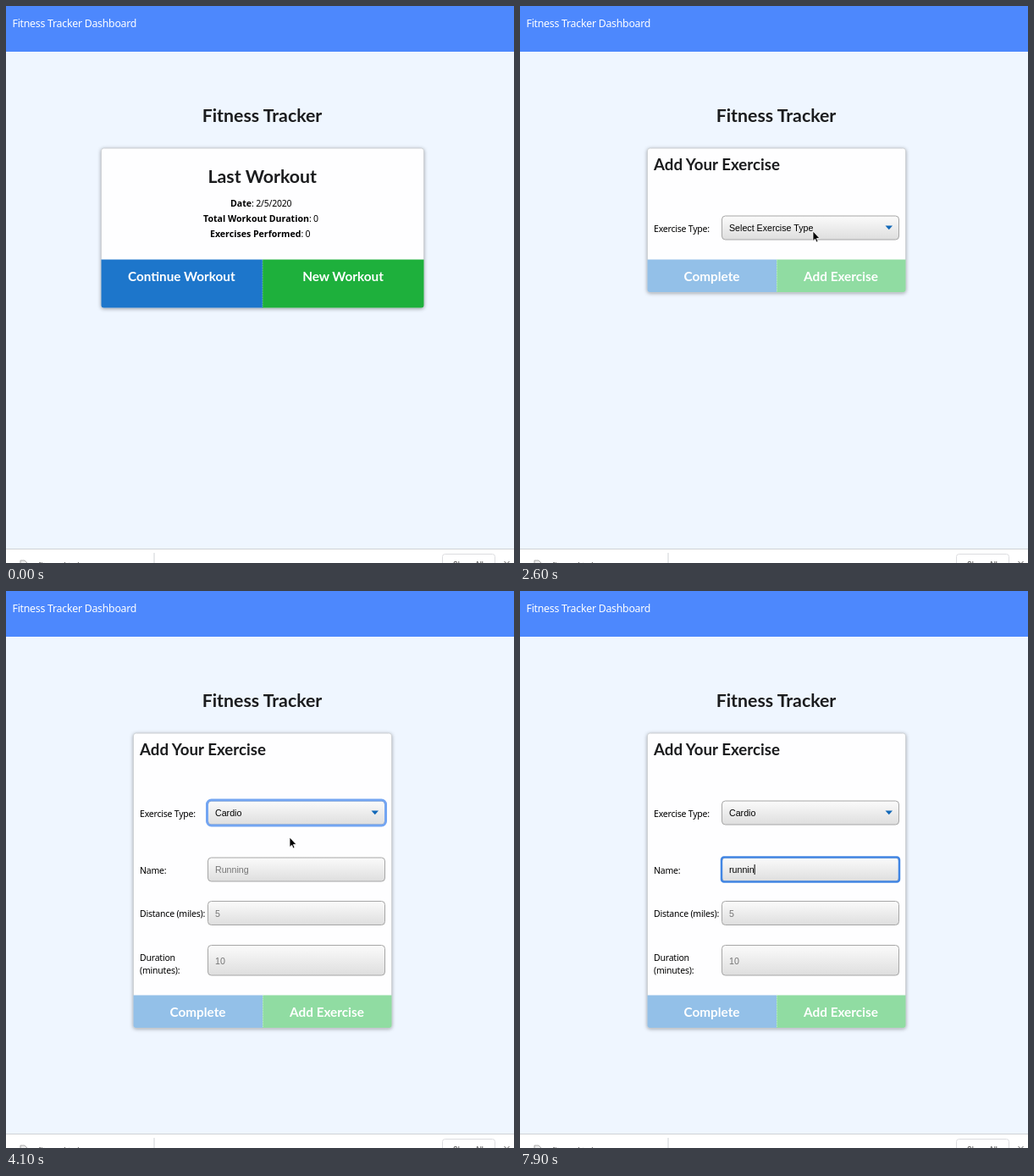
Write an HTML page that moves like this. It is 600 px wide and 658 px high and loops after 8000 ms.

```html
<!DOCTYPE html>
<html lang="en">
<head>
<meta charset="utf-8">
<title>Fitness Tracker</title>
<style>
  html, body { margin: 0; width: 100%; height: 100%; overflow: hidden; background: #eff6ff; }
  svg { display: block; width: 600px; height: 658px; }
  .body { font: 10.5px "Noto Sans", "Open Sans", sans-serif; letter-spacing: -.02em; }
  .body .b { font-weight: 700; font-size: 10.6px; letter-spacing: 0; }
  .head { font: 700 21.3px Lato, sans-serif; fill: #1b1c1e; text-anchor: middle; }
  .btn { font: 700 15.3px Lato, sans-serif; fill: #fff; text-anchor: middle; }
  .field { font: 10.67px "Liberation Sans", Arial, sans-serif; }
  .hint { fill: #757575; }
  .ui { font: 10.2px Inter, sans-serif; }
  .box { fill: url(#grey); stroke: #a6a6a6; }
  .shadow { filter: drop-shadow(0 1px 2px #0005); }
  .card { fill: #fefeff; stroke: #cfd2d6; }
  .seam { stroke: #fff; stroke-opacity: .45; stroke-dasharray: 1 1; }
  .ring { fill: none; stroke: #73a5f2; stroke-width: 3; }
</style>
</head>
<body>
<svg viewBox="0 0 600 658">
  <defs>
    <linearGradient id="grey" x2="0" y2="1">
      <stop stop-color="#fbfbfb"/><stop offset="1" stop-color="#dedede"/>
    </linearGradient>
  </defs>
  <rect width="600" height="658" fill="#eff6ff"/>
  <rect width="600" height="54" fill="#4d88fd"/>
  <text class="body" x="7.5" y="25" fill="#fff" style="font-size:12.3px">Fitness Tracker Dashboard</text>
  <text class="head" x="302.5" y="137">Fitness Tracker</text>

  <g id="home">
    <rect class="card shadow" x="112.5" y="168" width="381" height="188.5" rx="3"/>
    <text class="head" x="302.7" y="209">Last Workout</text>
    <g class="body">
      <text x="265" y="237"><tspan class="b">Date</tspan>: 2/5/2020</text>
      <text x="233" y="255"><tspan class="b">Total Workout Duration</tspan>: 0</text>
      <text x="241" y="273"><tspan class="b">Exercises Performed</tspan>: 0</text>
    </g>
    <path fill="#1d76cb" d="M112.5 299.5H303V356.5H115.5a3 3 0 0 1-3-3Z"/>
    <path id="newBtn" d="M303 299.5H493.5V353.5a3 3 0 0 1-3 3H303Z"/>
    <path class="seam" d="M303 300V356"/>
    <g class="btn"><text x="207.3" y="325">Continue Workout</text><text x="398" y="325">New Workout</text></g>
  </g>

  <g id="add">
    <rect id="card" class="card shadow" x="150.5" y="168" width="305" rx="3"/>
    <text class="head" x="158" y="194" style="font-size:18.7px;text-anchor:start">Add Your Exercise</text>
    <text class="body" x="158" y="266.5">Exercise Type:</text>
    <rect class="box" x="238.5" y="248" width="209" height="28" rx="4"/>
    <rect id="typeRing" class="ring" x="237.5" y="247" width="211" height="30" rx="5"/>
    <g id="closed">
      <text id="type" class="field" x="247" y="266"></text>
      <path d="M431.5 259.5h8.5l-4.2 4.7Z" fill="#1168b8"/>
    </g>
    <g id="fields">
      <g class="body">
        <text x="158" y="333.5">Name:</text>
        <text x="158" y="385">Distance (miles):</text>
        <text x="158" y="437">Duration</text>
        <text x="158" y="451.5">(minutes):</text>
      </g>
      <rect class="box" x="238.5" y="315" width="209" height="28" rx="4"/>
      <rect class="box" x="238.5" y="366.5" width="209" height="28" rx="4"/>
      <rect class="box" x="238.5" y="418.5" width="209" height="35.5" rx="4"/>
      <rect id="nameRing" class="ring" x="238" y="314.5" width="210" height="29" rx="3" style="stroke:#4286e4;stroke-width:2.5"/>
      <g class="field">
        <text id="name" x="247" y="333"></text>
        <text class="hint" x="247" y="385">5</text>
        <text class="hint" x="247" y="440.5">10</text>
      </g>
      <rect id="caret" y="323" width="1" height="12"/>
    </g>
    <g id="foot">
      <path fill="#93c0e8" d="M150.5 299.5H303V338H153.5a3 3 0 0 1-3-3Z"/>
      <path fill="#90dca2" d="M303 299.5H455.5V335a3 3 0 0 1-3 3H303Z"/>
      <path class="seam" d="M303.5 300V338"/>
      <g class="btn"><text x="226.5" y="325">Complete</text><text x="379" y="325">Add Exercise</text></g>
    </g>
    <g id="menu" class="ui">
      <rect x="230.5" y="251.5" width="210" height="50" rx="4" fill="#e5e6e9" stroke="#c4c5c9" stroke-width=".6" style="filter:drop-shadow(0 3px 4px #0005)"/>
      <rect id="pick" x="230.5" width="210" height="14.5" fill="#2f7bf6"/>
      <path d="M235 262.5l2.3 2.8 4.2-6.3" fill="none" stroke="#a3a4a7" stroke-width="1.2"/>
      <text x="247" y="265.8" fill="#adaeb1">Select Exercise Type</text>
      <text id="opt0" x="247" y="280.3">Resistance</text>
      <text id="opt1" x="247" y="294.8">Cardio</text>
    </g>
  </g>

  <!-- download bar and link bubble -->
  <rect y="642" width="600" height="16" fill="#fff"/>
  <path d="M0 641.5H600M175 646V658" stroke="#cfd2d6"/>
  <path d="M17 658v-3h5l3 3" fill="#eee" stroke="#999" stroke-width=".8"/>
  <g class="ui" style="font-size:8.8px" fill="#444">
    <text x="38" y="664">fitness.html</text>
    <rect x="515.5" y="647.5" width="62" height="20" rx="3" fill="#fff" stroke="#dcdde0"/>
    <text x="528" y="662.5">Show All</text>
    <path d="M588.5 656l6 6M594.5 656l-6 6" stroke="#555"/>
    <g id="bubble">
      <path class="shadow" d="M0 625.5H110a2.5 2.5 0 0 1 2.5 2.5V642H0Z" fill="#fff" stroke="#c6c8cb" stroke-width=".8"/>
      <text x="3.5" y="636.7" style="font-size:8.7px" fill="#505256">localhost:3002/exercise</text>
    </g>
  </g>

  <g id="cursor">
    <path id="arrow" d="M0 0V11.5L2.6 9.2 4.2 13 6 12.2 4.4 8.5H8Z" stroke="#fff" stroke-width=".8"/>
    <path id="hand" d="M-2 -5.5q1.4-1.2 2 .3L1-2 2.3-2.4 3.6-1.8 5-1.7 6.2-.6Q7 2.5 5.4 4.2V6H-.2L-2.6 2.7-4 .4q.4-1.4 2 .2L-.8 1.2Z" fill="#fff" stroke="#111" stroke-width=".9"/>
    <path id="beam" d="M-2.5 -5.5Q0-5.5 0-4 0-5.5 2.5-5.5M0-4V4M-2.5 5.5Q0 5.5 0 4 0 5.5 2.5 5.5" fill="none" stroke="#111"/>
  </g>
</svg>
<script>
const LOOP = 8000, STEP = 100;
const el = id => document.getElementById(id);
const show = (id, on) => el(id).style.display = on ? '' : 'none';
const set = (id, key, value) => el(id).setAttribute(key, value);

// pointer stops: time, x, y
const path = [
  [100, 585, 486], [200, 575, 482], [300, 575, 482], [800, 453, 342],
  [2100, 453, 341], [2600, 346, 266], [2900, 346, 268], [3200, 347, 269],
  [3800, 335, 291], [4200, 335, 291], [4800, 319, 328], [LOOP, 319, 328]
];
// moments at which each letter of the name is typed
const keys = [6800, 7000, 7300, 7500, 7800, 7900];

function pointer(t) {
  const i = Math.max(1, path.findIndex(p => p[0] > t));
  const [a, b] = [path[i - 1], path[i]];
  const u = Math.max(0, (t - a[0]) / (b[0] - a[0]));
  const e = u * u * (3 - 2 * u);
  return [a[1] + (b[1] - a[1]) * e, a[2] + (b[2] - a[2]) * e];
}

function draw(t) {
  const [x, y] = pointer(t);
  const home = t < 1300, menu = t >= 2900 && t < 4000, form = t >= 4000, focus = t >= 6000;
  const hover = t >= 600 && x < 493 && y < 356;

  show('home', home);
  show('add', !home);
  set('newBtn', 'fill', hover ? '#169f30' : '#1eb03c');
  show('bubble', t < 2100 && hover);

  set('card', 'height', form ? 348 : 170);
  set('foot', 'transform', `translate(0 ${form ? 178 : 0})`);
  show('fields', form);
  show('closed', !menu);
  show('typeRing', t >= 2900 && !focus);
  el('type').textContent = form ? 'Cardio' : 'Select Exercise Type';

  const row = y > 284 ? 1 : y > 273 ? 0 : -1;
  show('menu', menu);
  show('pick', row >= 0);
  set('pick', 'y', 269.5 + 14.5 * row);
  for (const i of [0, 1]) set('opt' + i, 'fill', row === i ? '#fff' : '#222');

  const typed = 'runnin'.slice(0, keys.filter(k => k <= t).length);
  el('name').textContent = typed || 'Running';
  set('name', 'class', typed ? '' : 'hint');
  show('nameRing', focus);
  show('caret', focus && (typed || t < 6500));
  set('caret', 'x', typed && form ? 247 + el('name').getComputedTextLength() : 247);

  const kind = hover && t < 2200 ? 'hand' : form && y > 314 ? 'beam' : 'arrow';
  for (const k of ['arrow', 'hand', 'beam']) show(k, k === kind);
  show('cursor', t >= 100 && !typed);
  set('cursor', 'transform', `translate(${x} ${y})`);
}

const start = performance.now();
function tick() {
  const t = (performance.now() - start) % LOOP;
  draw(Math.floor(t / STEP) * STEP);
  requestAnimationFrame(tick);
}
tick();
</script>
</body>
</html>
```
